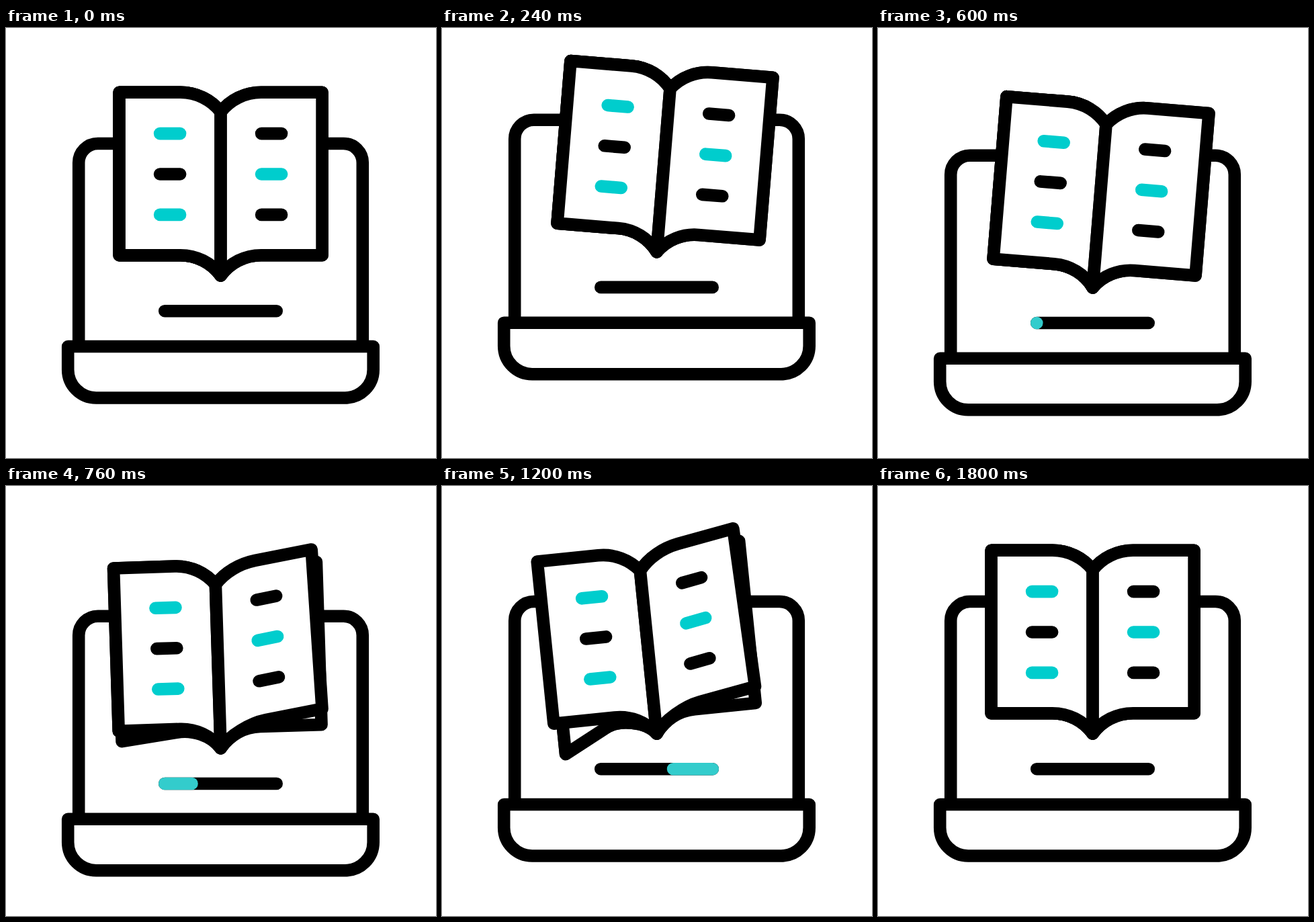
Animation, 640 px wide and 640 px high, one loop 2040 ms. Source, as an HTML page:

```html
<!DOCTYPE html>
<html lang="en">
<head>
<meta charset="utf-8">
<title>Online reading</title>
<style>
  html, body { margin: 0; width: 100%; height: 100%; overflow: hidden; background: #fff; }
  svg { display: block; width: 100%; height: 100%; }
  path { fill: none; stroke: #000; stroke-width: 18.6; stroke-linecap: round; stroke-linejoin: round; }
  .sheet { fill: #fff; }
  .teal { stroke: #00cdcd; }
  #progress { stroke: #33cccc; }
</style>
</head>
<body>
<svg viewBox="0 0 640 640">
  <g id="scene">
    <path d="M108.2 474V200.5a28.5 28.5 0 0 1 28.5-28.5H502.3a28.5 28.5 0 0 1 28.5 28.5V474"/>
    <path class="sheet" d="M92.2 474H546.7V508.5a42 42 0 0 1-42 42H134.2a42 42 0 0 1-42-42Z"/>
    <path d="M236.3 421.2H402.7"/>
    <path id="progress"/>
    <g id="book">
      <path class="sheet" id="backRight"/>
      <path class="sheet" id="lowerFlap"/>
      <path class="sheet" id="upperFlap"/>
      <path class="sheet" id="frontLeft"/>
      <path class="sheet" id="frontRight"/>
    </g>
  </g>
</svg>
<script>
const LOOP = 2040, STEP = 40, REST = 1800;
const FOOT = -30.3, HEAD = -272.7, BEND = 60, ARM = 91;
const $ = id => document.getElementById(id);
const lerp = (a, b, k) => a + (b - a) * k;

// Smooth step from 0 to 1 between two times.
function ease(t, from, to) {
  const x = Math.min(1, Math.max(0, (t - from) / (to - from)));
  return x * x * (3 - 2 * x);
}

// Straight part of a page edge with its handle: [handle, bend, corner].
function edge(x, y, degrees) {
  const a = degrees * Math.PI / 180;
  const arm = ARM * Math.cos(a) ** 2;
  return [-24, 0, arm].map(r => [x + r * Math.cos(a), y + r * Math.sin(a)]);
}

// Page outline from the foot of the spine, outwards and back to its head.
function page(turn = 0, rise = 0, footSlide = 0, headSlide = 0) {
  return [
    [0, 0], [14, -19.2], ...edge(BEND + footSlide, FOOT + rise, turn),
    ...edge(BEND + headSlide, HEAD + rise / 2, turn).reverse(), [14, -261.5], [0, -243.5]
  ];
}

const FLAT = page();
const LIFTED = page(-17.4, -17.5, 15, 0);
const DROPPED = page(28, 14.7, 15, 15);

function drawPage(id, side, shape = FLAT, amount = 0) {
  const p = FLAT.map(([x, y], i) =>
    `${side * lerp(x, shape[i][0], amount)} ${lerp(y, shape[i][1], amount)}`);
  $(id).setAttribute("d",
    `M${p[0]}C${p[1]} ${p[2]} ${p[3]}L${p[4]}L${p[5]}L${p[6]}C${p[7]} ${p[8]} ${p[9]}Z`);
}

function addBars(side) {
  return [0, 1, 2].map(row => {
    const bar = document.createElementNS("http://www.w3.org/2000/svg", "path");
    bar.setAttribute("d", "M-15 0H15");
    if ((row % 2 === 0) === (side < 0)) bar.setAttribute("class", "teal");
    $("book").append(bar);
    return bar;
  });
}

function placeBars(bars, side, lift) {
  bars.forEach((bar, row) => {
    const x = side * 75.5 - lift, y = -211.4 + 60.4 * row - 18 * lift;
    bar.setAttribute("transform", `translate(${x} ${y}) rotate(${-17.4 * lift})`);
  });
}

const leftBars = addBars(-1), rightBars = addBars(1);
drawPage("backRight", 1);
drawPage("frontLeft", -1);
placeBars(leftBars, -1, 0);

function draw(time) {
  const t = Math.min(REST, Math.floor((time % LOOP) / STEP) * STEP);
  const bounce = -36.4 * ease(t, 0, 200) + 60.5 * ease(t, 200, 700) - 24.1 * ease(t, 700, 1009);
  const tilt = 4.7 * ease(t, 0, 200) - 18.5 * ease(t, 600, 1000) + 13.8 * ease(t, 1000, 1362);
  const lift = 1.01 * (ease(t, 600, 900) - ease(t, 900, 1567));
  const close = 1 - ease(t, 1140, 1820);

  $("scene").setAttribute("transform", `translate(0 ${bounce})`);
  $("book").setAttribute("transform", `translate(319.6 368.5) rotate(${tilt})`);
  drawPage("lowerFlap", -1, DROPPED, ease(t, 600, 1020) * close);
  drawPage("upperFlap", -1, DROPPED, ease(t, 795, 1140) * close);
  drawPage("frontRight", 1, LIFTED, lift);
  placeBars(rightBars, 1, lift);

  const along = k => lerp(236.3, 402.7, k);
  const progress = $("progress");
  progress.setAttribute("d", `M${along(ease(t, 900, 1400))} 421.2H${along(ease(t, 600, 1100))}`);
  progress.setAttribute("visibility", t >= 600 && t < 1400 ? "visible" : "hidden");
}

const start = performance.now();
function tick() {
  draw(performance.now() - start);
  requestAnimationFrame(tick);
}
tick();
</script>
</body>
</html>
```
